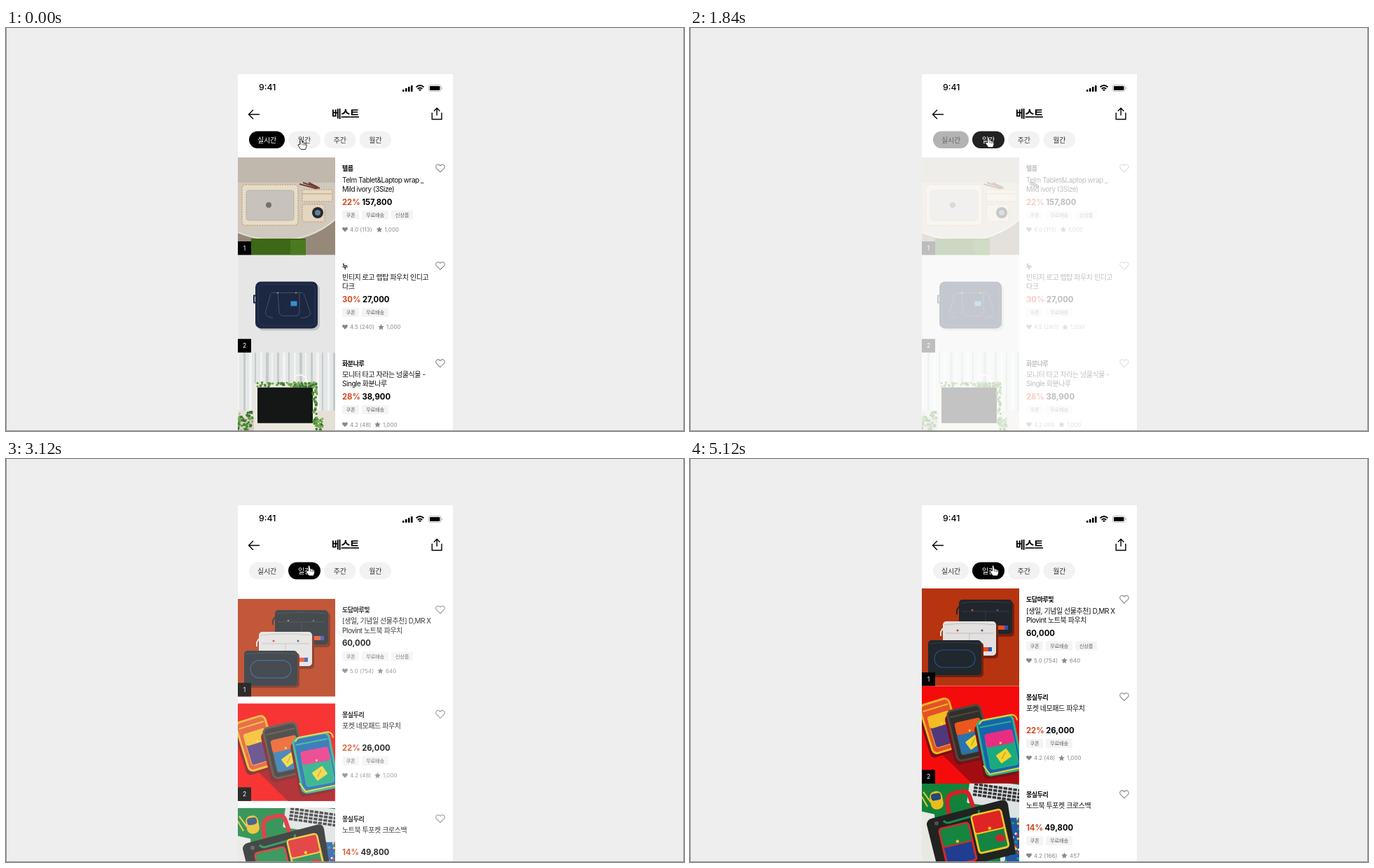
An HTML page for the animation above (5.2 s loop, 968 by 576 pixels).

```html
<!DOCTYPE html>
<html lang="ko">
<head>
<meta charset="utf-8">
<style>
  html, body { margin: 0; width: 100%; height: 100%; overflow: hidden; background: #eee; }
  svg { display: block; width: 968px; height: 576px; font-family: Inter, "Noto Sans CJK KR", "Noto Sans CJK", sans-serif; }
  .title { font: 700 15px Inter, "Noto Sans CJK KR", "Noto Sans CJK", sans-serif; letter-spacing: -.9px; }
  .tab { font-size: 10px; letter-spacing: -.15px; text-anchor: middle; }
  .brand { font-size: 9px; font-weight: 700; letter-spacing: -.45px; }
  .name { font-size: 10px; letter-spacing: -.45px; fill: #111; }
  .price { font-size: 11.3px; font-weight: 700; }
  .tag { font-size: 7.4px; letter-spacing: -.3px; text-anchor: middle; fill: #666; }
  .stat { font-size: 8px; fill: #888; }
  .rank { font-size: 8.5px; text-anchor: middle; fill: #fff; }
</style>
</head>
<body>
<svg id="stage" viewBox="0 0 968 576"></svg>
<script>
const LOOP = 5200, STEP = 80, ROW = 139.4;
const CLICK = 1520, LEAVE = 1585, ENTER = 2787;

let seed = 7;
const random = () => (seed = seed * 16807 % 2147483647) / 2147483647;
const repeat = (n, fn) => Array.from({ length: n }, (_, i) => fn(i)).join('');
const rect = (x, y, w, h, fill, rx = 0, more = '') =>
  `<rect x="${x}" y="${y}" width="${w}" height="${h}" rx="${rx}" fill="${fill}" ${more}/>`;
const dot = (x, y, r, fill) => `<circle cx="${x}" cy="${y}" r="${r}" fill="${fill}"/>`;
const path = (d, fill, stroke = 'none', width = 1) =>
  `<path d="${d}" fill="${fill}" stroke="${stroke}" stroke-width="${width}"/>`;
const line = (d, stroke, width = 1) => path(d, 'none', stroke, width);
const text = (x, y, cls, s, fill = '') =>
  `<text x="${x}" y="${y}" class="${cls}" ${fill && `fill="${fill}"`}>${s}</text>`;
const at = (x, y, content, angle = 0) =>
  `<g transform="translate(${x} ${y}) rotate(${angle})">${content}</g>`;

// Product pictures, each about 140 px square
function deskCase() {
  const knit = 'stroke="#cdb08d" stroke-width="2" stroke-dasharray="2 1.5"';
  return rect(0, 0, 140, 140, '#96897a') +
    rect(0, 0, 140, 60, '#bcb4a9') +
    path('M0 34Q60 10 140 34V88Q105 118 62 118Q25 118 0 107Z', '#d0c9bd') +
    rect(0, 0, 140, 36, '#c0b8ad') +
    line('M0 107Q25 118 62 118Q105 118 140 88', '#e3ddd2', 2) +
    rect(19, 116, 78, 24, '#3c6818') + rect(75, 118, 22, 22, '#4a7a20') +
    line('M88 38L114 45M93 36L117 44M101 36L115 43', '#743b2f', 2) +
    rect(6, 39, 80, 58, '#e8dcc9', 5, knit) +
    rect(12, 47, 68, 43, '#c7c3bc', 4, 'stroke="#aaa59b" stroke-width=".7"') +
    dot(44, 68, 4, '#777167') +
    rect(92, 46, 43, 17, '#e6d8c2', 2, knit) + line('M92 52H134', '#b99c78') +
    rect(92, 67, 32, 25, '#e4d6bf', 3, knit) + dot(114, 79, 8, '#272a30') + dot(114, 79, 4, '#64819a');
}

function denimPouch() {
  const seam = '#46506a';
  return rect(0, 0, 140, 140, '#e6e6e6') +
    rect(28, 41, 89, 67, '#c2c3c5', 8) + rect(25, 38, 89, 67, '#1c2742', 8) +
    line('M26 58H23V68H26', '#1c2742', 2) +
    line('M29 47Q31 41 39 42H102Q109 42 110 48V95Q109 101 102 101H38Q30 101 29 94Z', '#2c3856') +
    line('M48 54H93M57 54L59 82Q60 87 65 87H84Q88 86 88 82V54M47 55L39 83Q41 89 50 90M94 55L104 84Q101 90 90 90', seam) +
    dot(57, 54, 1, '#c69a66') + dot(83, 54, 1, '#c69a66') + rect(75.5, 66, 9, 7, '#3a8bd0');
}

function plantMonitor() {
  const leaf = (x, y) => dot(x.toFixed(1), y.toFixed(1), (1 + random() * 1.2).toFixed(1),
    ['#4f8f38', '#75ad52', '#3a7430'][random() * 3 | 0]);
  return rect(0, 0, 140, 140, '#e4e7e6') +
    repeat(18, i => rect(i * 8, 0, 2 + i % 3, 96, i % 2 ? '#c4cbcd' : '#f3f4f2')) +
    rect(0, 83, 140, 57, '#e4e0d6') + rect(0, 94, 24, 46, '#d5cdbf') +
    line('M81 34Q94 27 100 43', '#f7f8f5', 2) +
    rect(23, 44, 90, 70, '#ebe9dd', 3) + rect(28, 50, 79, 51, '#151716', 1) +
    repeat(90, i => leaf(28 + random() * 84, 43 + random() * 6)) +
    repeat(45, i => leaf(107 + random() * 6, 47 + random() * 60)) +
    repeat(60, i => leaf(random() * 21, 85 + random() * 29)) +
    repeat(30, i => leaf(111 + random() * 10, 92 + random() * 19));
}

function threePouches() {
  const pouch = (x, y, fill, seam, extra = '') => at(x, y,
    rect(2, 3, 77, 50, '#76210d', 5) + rect(0, 0, 76, 49, fill, 5) +
    line('M2 5Q38 1 74 5M4 17H72M38 17V46', seam) + line('M0 10L-3 15V21', fill, 2) + extra);
  const label = rect(55, 37, 10, 6, '#e84c21') + rect(65, 37, 5, 6, '#334fb3');
  return rect(0, 0, 140, 140, '#b63410') +
    pouch(53, 16, '#20262b', '#353c41', dot(19, 15, 1.3, '#d36c31') + dot(55, 15, 1.3, '#2f6fac') + label) +
    pouch(30, 47, '#e2e1df', '#bebebc', dot(21, 13, 1.5, '#db3b22') + dot(56, 13, 1.5, '#315b9e') + label) +
    at(9, 74, rect(2, 3, 77, 50, '#76210d', 5) + rect(0, 0, 76, 50, '#20272d', 5) +
      line('M2 5Q38 1 74 5', '#353d44') +
      rect(9, 14, 58, 25, 'none', 12.5, 'stroke="#25548b" stroke-width="1.2"'));
}

function colorBags() {
  const bag = (x, y, w, h, angle, body, trim, flap, pocket, card) => at(x, y,
    rect(-w / 2 - 5, -h / 2 + 5, w, h, '#791016', 7) +
    rect(-w / 2, -h / 2, w, h, body, 7, `stroke="${trim}" stroke-width="3"`) +
    line(`M${-w / 2 + 3} ${-h / 2 + 9}H${w / 2 - 3}`, trim, 2) +
    rect(-w * .36, -h * .15, w * .78, h * .55, pocket, 4, `stroke="${trim}"`) +
    rect(-w * .36, -h * .25, w * .78, h * .25, flap, 4) +
    dot(2, -h * .04, 1.6, '#f8d655') +
    (card ? at(3, h * .2, rect(-9, -7, 18, 14, '#f2d42d', 1) + line('M-5 2L5 -3', '#c28a21'), -24) : ''), angle);
  return rect(0, 0, 140, 140, '#f60b0c') +
    path('M24 93L73 55L138 125V140H72Z', '#a50c11') +
    bag(27, 57, 43, 72, -17, '#e4512a', '#f5b51d', '#f4bb22', '#51387c') +
    bag(67, 67, 48, 73, -13, '#302f2d', '#55463a', '#eb571d', '#2774ae', true) +
    bag(111, 85, 52, 79, -11, '#1764ad', '#29b38a', '#e92d83', '#19aa80', true) +
    line('M82 55Q85 48 91 48L128 41Q135 41 136 49', '#e5d332', 2) +
    line('M88 114L97 126L140 117', '#e5d332', 2);
}

function crossBag() {
  const pocket = (x, y, flap, body, trim) => at(x, y,
    rect(0, 0, 43, 55, body, 4, `stroke="${trim}" stroke-width="3"`) +
    rect(0, 0, 43, 27, flap, 4, `stroke="${trim}" stroke-width="2"`) + dot(22, 23, 2.2, '#f4c928'));
  return rect(0, 0, 140, 140, '#12823a') +
    path('M0 40L18 44L26 140H0Z', '#e6e9e4') + line('M2 12L13 27M0 19L8 33', '#e9c52b', 2) +
    at(68, 0, rect(0, -8, 80, 36, '#dfe1e2', 2) +
      repeat(40, i => rect(7 + i % 10 * 7, -2 + (i / 10 | 0) * 5, 5.5, 3.6, '#353739', .6)), 8) +
    rect(112, 33, 28, 107, '#dce4e5') +
    rect(119, 49, 21, 91, '#2056a5') +
    repeat(35, () => dot((119 + random() * 21).toFixed(1), (48 + random() * 70).toFixed(1), 1.8,
      ['#e53826', '#f0d02c', '#18a66b', '#e4e8e6'][random() * 4 | 0])) +
    at(21, 24, rect(-9, -13, 18, 26, '#e9bd20', 8) + rect(-7, -10, 14, 10, '#244977', 4), -10) +
    line('M40 50L36 27Q36 17 45 14L59 11Q65 10 68 18L76 41', '#d71f26', 6) +
    path('M7 59Q7 52 14 50L113 24Q121 22 123 30L134 101L24 127Z', '#202322') +
    line('M31 53Q34 57 39 56L78 45Q83 43 81 38', '#168b4c', 3) +
    dot(21, 57, 3, '#4d5250') +
    at(0, 0, pocket(9, 69, '#16853f', '#203d91', '#d92827') + pocket(58, 61, '#df2424', '#148442', '#efc629'), -13) +
    `<ellipse cx="112" cy="78" rx="7" ry="5" fill="#d8202a"/>`;
}

const lists = {
  hourly: [
    { art: deskCase, brand: '텔름', name: ['Telm Tablet&amp;Laptop wrap _', 'Mild ivory (3Size)'], off: '22%', price: '157,800', isNew: true, score: '4.0 (113)', star: 202, count: '1,000' },
    { art: denimPouch, brand: '누', name: ['빈티지 로고 랩탑 파우치 인디고', '다크'], off: '30%', price: '27,000', score: '4.5 (240)', star: 204.5, count: '1,000' },
    { art: plantMonitor, brand: '화분나루', name: ['모니터 타고 자라는 넝쿨식물 -', 'Single 화분나루'], off: '28%', price: '38,900', score: '4.2 (48)', star: 199.5, count: '1,000' }
  ],
  daily: [
    { art: threePouches, brand: '도담마루빛', name: ['[생일, 기념일 선물추천] D,MR X', 'Plovint 노트북 파우치'], price: '60,000', isNew: true, score: '5.0 (754)', star: 203.5, count: '640' },
    { art: colorBags, brand: '몽실두리', name: ['포켓 네모패드 파우치'], off: '22%', price: '26,000', score: '4.2 (48)', star: 199.5, count: '1,000' },
    { art: crossBag, brand: '몽실두리', name: ['노트북 투포켓 크로스백'], off: '14%', price: '49,800', score: '4.2 (166)', star: 203.5, count: '457' }
  ]
};

const heart = 'M0 5.5L-5.2 .3C-8.5 -3.4 -3.4 -8 0 -3.7C3.4 -8 8.5 -3.4 5.2 .3Z';
const star = 'M0 -4.3L1.3 -1.5L4.3 -1.2L2 .9L2.7 4L0 2.4L-2.7 4L-2 .9L-4.3 -1.2L-1.3 -1.5Z';

function row(item, i) {
  const tags = [['쿠폰', 149, 24], ['무료배송', 177, 38]];
  if (item.isNew) tags.push(['신상품', 219, 31]);
  const off = item.off ? `<tspan fill="#d5461b">${item.off}</tspan><tspan dx="2.5">${item.price}</tspan>` : item.price;
  return `<g class="row" transform="translate(331 ${185 + i * ROW})">
    <svg width="139" height="139.5">${item.art()}</svg>
    ${rect(0, 120, 19, 19.5, '#000')}${text(9.5, 133, 'rank', i + 1)}
    ${text(149, 19.3, 'brand', item.brand)}
    ${item.name.map((s, n) => text(149, 35.5 + n * 13.2, 'name', s)).join('')}
    ${text(149, 67.5, 'price', off)}
    ${tags.map(([s, x, w]) => rect(x, 75.5, w, 13, '#f4f4f4', 1) + text(x + w / 2, 84.7, 'tag', s)).join('')}
    <g fill="#888">
      <path d="${heart}" transform="translate(153 103) scale(.62)"/>
      <path d="${star}" transform="translate(${item.star} 103)"/>
    </g>
    ${text(160, 106, 'stat', item.score)}${text(item.star + 7.5, 106, 'stat', item.count)}
    ${at(289, 15.5, line(heart, '#888', 1.1))}
  </g>`;
}

const header = text(361, 89.3, 'clock', '9:41').replace('class="clock"', 'font-size="12.3" font-weight="500"') +
  repeat(4, i => rect(566 + i * 4, 88 - i * 2, 2.6, 3 + i * 2, '#000', .7)) +
  line('M585.5 84.5Q591 79.5 596.5 84.5M587.7 87Q591 84 594.3 87', '#000', 1.8) + path('M589 88.2Q591 86.8 593 88.2L591 90.3Z', '#000') +
  rect(603.5, 81.5, 17.5, 9, '#fff', 2.5, 'stroke="#aaa" stroke-width=".8"') + rect(605, 83, 14.5, 6, '#000', 1.3) +
  rect(621.8, 84.5, 1, 3, '#aaa', .5) +
  line('M362 123.5H346.5M353 117L346.5 123.5L353 130', '#000', 1.4) +
  line('M608.3 121V130.5H622V121M615.2 125V115M611 118.8L615.2 114.6L619.4 118.8', '#000', 1.4) +
  text(465, 127.8, 'title', '베스트');

const tabs = [['실시간', 347, 51], ['일간', 403, 46], ['주간', 454, 45.5], ['월간', 504.5, 45.5]];

const $ = id => document.getElementById(id);
$('stage').innerHTML = rect(0, 0, 968, 576, '#eee') + rect(331, 66, 307, 510, '#fff') + header +
  `<circle id="spinner" cx="485" cy="237" r="15" fill="none" stroke="#cfcfcf" stroke-width="5" pathLength="100" transform="rotate(-90 485 237)"/>` +
  Object.entries(lists).map(([id, items]) => `<g id="${id}">${items.map(row).join('')}</g>`).join('') +
  tabs.map(([s, x, w], i) => `<g id="tab${i}">${rect(x, 147.5, w, 24.5, '#f2f2f2', 12.2)}${text(x + w / 2, 163.7, 'tab', s, '#333')}</g>`).join('') +
  `<g id="cursor">
    <g id="hand">${path('M-1 8V1.3Q-1 0 .1 0Q1.2 0 1.3 1.3L2 5.2Q3.5 4.2 4.2 5.8Q5.7 5 6.3 6.7Q8 6.2 8 8V11L6.5 15H0L-3.6 10Q-4.6 8 -3 7.7Z', '#fff', '#111', .9)}${line('M2 6V9M4.3 6.5V9.5M6.3 7V9.5', '#222', .7)}</g>
    <g id="arrow">${path('M0 0V12.2L2.8 9.5L4.9 14L7 13L5 8.8H8.7Z', '#fff', '#111', .9)}</g>
  </g>` +
  line('M.5 0V575.5H967.5V0', '#929292');

const clamp = v => Math.max(0, Math.min(1, v));
const settle = (t, start) => t < start ? 0 : 1 - Math.exp((start - t) / 189);
const gray = v => `rgb(${v},${v},${v})`;
const rows = [...$('daily').children];

function paintTab(i, fill, color) {
  const [pill, label] = $('tab' + i).children;
  pill.setAttribute('fill', fill);
  label.setAttribute('fill', color);
}

function draw(now) {
  const t = Math.floor(now % LOOP / STEP) * STEP;
  const leave = settle(t, LEAVE), enter = settle(t, ENTER);

  $('hourly').setAttribute('opacity', leave > .98 ? 0 : 1 - leave);
  $('daily').setAttribute('opacity', enter);
  rows.forEach((r, i) => {
    const drop = (1 - enter) * 29 * (3 + 2 * i);
    r.setAttribute('transform', `translate(331 ${185 + i * ROW + drop})`);
  });

  $('spinner').setAttribute('opacity', leave * (1 - enter));
  $('spinner').setAttribute('stroke-dasharray', `${100 * clamp((t - 1700) / 987)} 200`);

  paintTab(0, gray(242 * leave), gray(255 - 204 * leave));
  const selected = t >= CLICK;
  const loading = t > 1700 && t < 2880;
  paintTab(1, selected ? (loading ? '#222' : '#000') : '#f2f2f2', selected ? '#fff' : '#333');

  const move = clamp((t - 1720) / 280);
  const isArrow = t >= 320 && t < 1760;
  $('cursor').setAttribute('transform', `translate(${421 + 11.5 * move} ${158.5 - 6.5 * move})`);
  $('arrow').setAttribute('visibility', isArrow ? 'visible' : 'hidden');
  $('hand').setAttribute('visibility', isArrow ? 'hidden' : 'visible');
}

function tick() {
  draw(performance.now());
  requestAnimationFrame(tick);
}
tick();
</script>
</body>
</html>
```
